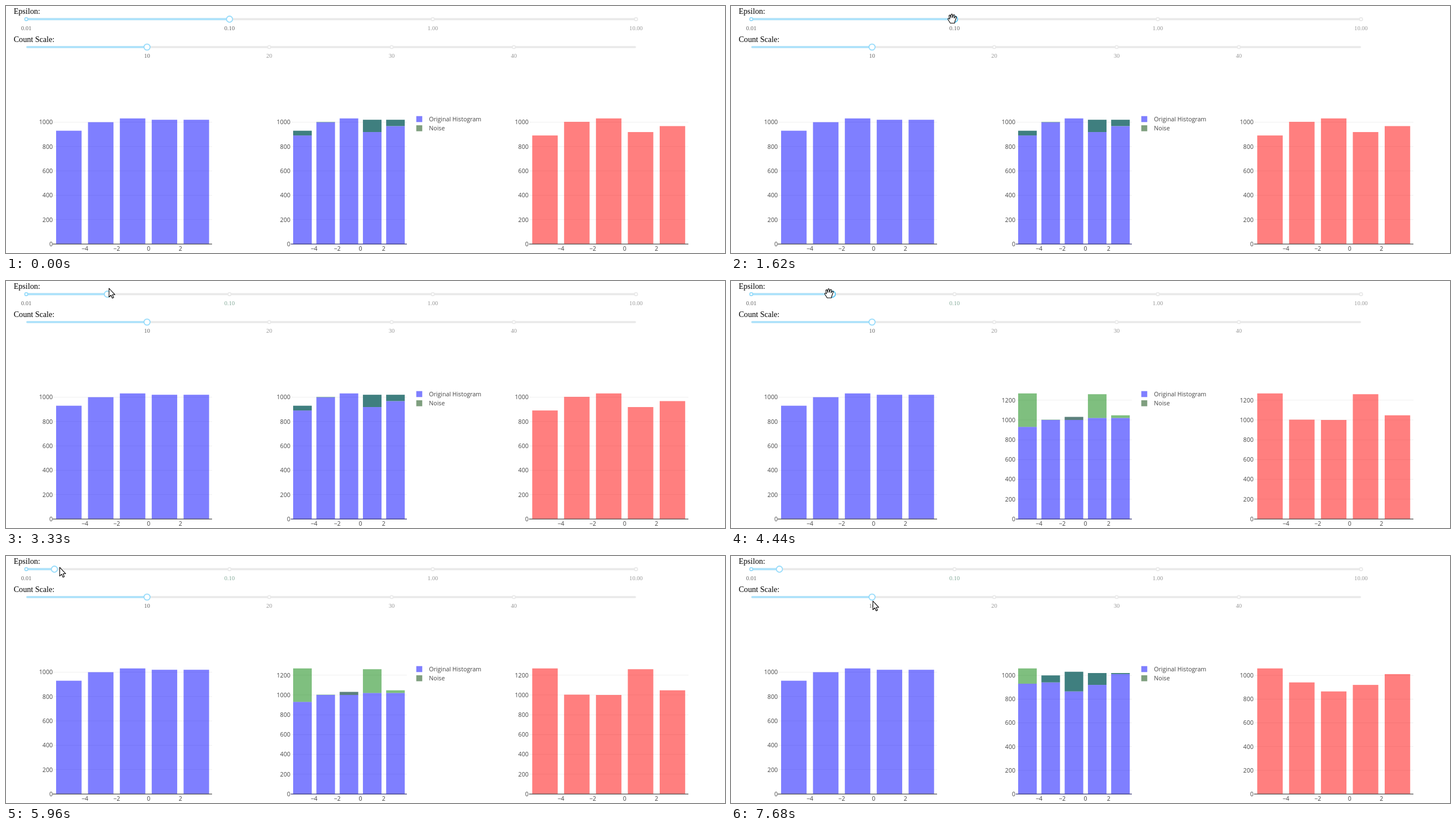
Write an HTML page that moves like this. It is 1277x439 px and loops after 8000 ms.

```html
<!DOCTYPE html>
<html lang="en">
<head>
<meta charset="utf-8">
<title>Noise histogram</title>
<style>
html, body { margin: 0; width: 100%; height: 100%; overflow: hidden; background: #fff; }
svg { display: block; width: 1277px; height: 439px; isolation: isolate; }
text { font: 10.6px "Open Sans", sans-serif; fill: #444; }
.title { font: 14.1px "Liberation Serif", serif; fill: #000; }
.mark { font: 10.6px "Liberation Serif", serif; fill: #999; text-anchor: middle; }
.mark.on { fill: #666; }
.mark.passed { fill: #84aa99; }
.tip { font: 11.3px "Liberation Sans", sans-serif; }
.cross { stroke: #fff; stroke-width: 2; mix-blend-mode: difference; }
.cursor { fill: #fff; stroke: #000; stroke-width: 1.1; stroke-linejoin: round; }
.icons { fill: none; stroke: #c7c7c7; stroke-width: 1.8; }
.solid { fill: #c7c7c7; stroke: none; }
</style>
</head>
<body>
<svg viewBox="0 0 1277 439">
  <rect width="1277" height="439" fill="#fff"/>
  <text class="title" x="13.7" y="14">Epsilon:</text>
  <text class="title" x="13.7" y="64">Count Scale:</text>
  <g id="charts"></g>
  <g id="legend">
    <rect x="728.7" y="195.7" width="10.6" height="10.6" fill="#7f7fff"/>
    <rect x="728.7" y="212" width="10.6" height="10.6" fill="#7f9f7f"/>
    <text x="751.3" y="205">Original Histogram</text>
    <text x="751.3" y="221.3">Noise</text>
  </g>
  <g id="sliders"></g>
  <g id="modebar"></g>
  <g id="tooltip" visibility="hidden">
    <path d="M544 221.5l5-5v-4h91v18.500h-91v-4z" fill="#00f"/>
    <rect x="641" y="211.500" width="71" height="20" fill="#fff" fill-opacity=".8"/>
    <text class="tip" x="551" y="225.500" style="fill:#fff;font-weight:bold">(−4.997027, 930)</text>
    <text class="tip" x="643.500" y="225.500" style="fill:#00f">Original His...</text>
  </g>
  <g id="pointer"></g>
</svg>
<script>
const LOOP = 8000, STEP = 65, BASE = 423, TOP = 223.2;
const $ = id => document.getElementById(id);
const rect = (x, y, w, h, fill, more = '') =>
  `<rect x="${x}" y="${y}" width="${w}" height="${h}" fill="${fill}" ${more}/>`;
const text = (x, y, str, attrs) => `<text x="${x}" y="${y}" ${attrs}>${str}</text>`;

const original = [930, 1000, 1031, 1020, 1020];
const noisy = [
  { from: 0, values: [891, 1003, 1031, 919, 968], loss: '#3f7f7f' },
  { from: 3450, values: [1268, 1003, 1000, 1260, 1047], loss: '#5c807c' },
  { from: 6030, values: [1059, 941, 865, 920, 1011], loss: '#3f7f7f' }
];

// Time spans in which the pointer moves; it rests in between.
const spans = [[580, 1360], [1420, 1680], [1890, 2650], [2730, 3180], [3330, 3450],
  [3930, 4190], [4380, 4590], [4860, 5620], [5770, 6550], [6630, 7410],
  [7470, 7470], [7680, 7680]];

// time, x, y, pointer shape, epsilon handle x
const keys = [
  [580, 962, 430, 'cross', 397],
  [645, 800, 395, 'arrow', 397],
  [710, 648, 353, 'cross', 397],
  [840, 526, 263, 'cross', 397],
  [905, 478, 210, 'arrow', 397],
  [1035, 415, 130, 'arrow', 397],
  [1360, 364, 42, 'arrow', 397],
  [1420, 374, 35, 'arrow', 397],
  [1550, 391, 23, 'hand', 397],
  [1680, 395, 22, 'hand', 397],
  [1890, 396, 21, 'grab', 397],
  [2470, 311, 22, 'grab', 318],
  [2650, 255, 22, 'grab', 268],
  [2730, 246, 22, 'grab', 257],
  [3180, 182, 14, 'grab', 180],
  [3330, 183, 13, 'arrow', 180],
  [3930, 181, 13, 'arrow', 180],
  [4190, 159, 14, 'arrow', 180],
  [4380, 166, 18, 'arrow', 180],
  [4440, 174, 22, 'hand', 180],
  [4590, 181, 22, 'hand', 180],
  [4860, 181, 20, 'grab', 180],
  [5300, 125, 30, 'grab', 128],
  [5620, 95, 21, 'grab', 86],
  [5770, 95, 20, 'arrow', 86],
  [5960, 95, 20, 'arrow', 86],
  [6550, 139, 39, 'arrow', 86],
  [6630, 150, 46, 'arrow', 86],
  [7050, 277, 92, 'arrow', 86],
  [7410, 246, 85, 'arrow', 86],
  [7470, 252, 81, 'arrow', 86],
  [7680, 252, 80, 'arrow', 86]
];

function heldTime(t) {
  const span = spans.filter(s => s[0] <= t).pop();
  return span ? Math.min(span[1], span[0] + Math.floor((t - span[0] + 5) / STEP) * STEP) : 0;
}

function poseAt(t) {
  const i = keys.findLastIndex(k => k[0] <= t);
  if (i < 0) return { shape: 'none', x: 0, y: 0, handle: 397 };
  const a = keys[i], b = keys[i + 1] || a;
  const f = b === a ? 0 : (t - a[0]) / (b[0] - a[0]);
  const mix = n => a[n] + (b[n] - a[n]) * f;
  return { x: mix(1), y: mix(2), shape: a[3], handle: mix(4) };
}

function chart({ left, right, label, bar, step, tick, axis }, max, bars) {
  const scale = TOP / max;
  let out = '';
  for (let v = 0; v <= max; v += 200) {
    const y = BASE - v * scale;
    if (v) out += rect(left, y - .45, right - left, .9, '#eee');
    out += text(label, y + 3.9, v, 'text-anchor="end"');
  }
  bars.forEach((parts, i) => parts.forEach(([lo, hi, fill, alpha = .5]) => {
    out += rect(bar + i * step, BASE - hi * scale, step * .8, (hi - lo) * scale, fill,
      `fill-opacity="${alpha}"`);
  }));
  out += rect(left - 1, BASE - .5, right - left + 1, 1.2, axis);
  ['−4', '−2', '0', '2'].forEach((s, i) => {
    out += text(tick + i * step, 435, s, 'text-anchor="middle"');
  });
  return out;
}

function drawCharts({ values, loss }) {
  const max = Math.max(...original, ...values);
  const stacked = original.map((v, i) => {
    const n = values[i];
    return n >= v ? [[0, v, '#00f'], [v, n, '#008000']]
                  : [[0, n, '#00f'], [n, v, loss, 1]];
  });
  $('charts').innerHTML =
    chart({ left: 84, right: 366, label: 83, bar: 89, step: 56.6, tick: 140, axis: '#444' },
      1031, original.map(v => [[0, v, '#00f']])) +
    chart({ left: 507, right: 712, label: 505, bar: 510, step: 41.3, tick: 547, axis: '#2e2e70' },
      max, stacked) +
    chart({ left: 930, right: 1212, label: 928, bar: 934.6, step: 56.6, tick: 985.5, axis: '#444' },
      Math.max(...values), values.map(v => [[0, v, '#f00']]));
}

const ring = (x, y, r, color) =>
  `<circle cx="${x}" cy="${y}" r="${r}" fill="#fff" stroke="${color}" stroke-width="1.8"/>`;

function slider(y, handle, dots, labels, shape) {
  let out = rect(36, y - 1.8, 1083, 3.6, '#e9e9e9', 'rx="1.8"') +
    rect(36, y - 1.8, handle - 36, 3.6, '#abe2fb', 'rx="1.8"');
  dots.forEach((x, i) => {
    const on = x <= handle + .5;
    out += ring(x, y, 2.7, on ? '#96dbfa' : '#e9e9e9') +
      text(x, y + 19.400, labels[i], `class="mark ${on ? 'on' : labels[i] === '0.10' ? 'passed' : ''}"`);
  });
  if (shape === 'grab') out += `<circle cx="${handle}" cy="${y}" r="8" fill="#57c5f7" opacity=".3"/>`;
  const busy = shape === 'grab' || shape === 'hand';
  return out + ring(handle, y, 5.4, busy ? '#57c5f7' : '#96dbfa');
}

function drawSliders({ handle, shape }) {
  $('sliders').innerHTML =
    slider(23.4, handle, [36, 397, 758, 1119], ['0.01', '0.10', '1.00', '10.00'], shape) +
    slider(73, 250.500, [250.500, 467.5, 685, 902], ['10', '20', '30', '40']);
}

const modebar = `<g class="icons">
  <path class="solid" d="M631 108.500h3.500l1.500-2h4l1.500 2h3.500v9.500h-14z"/>
  <circle cx="638" cy="113" r="2.6" stroke="#fff" stroke-width="1.3"/>
  <g stroke="#7a7a7a"><circle cx="664.500" cy="111" r="4.300"/>
    <path d="M667.500 114.500l4.500 4.500M662 111h5M664.500 108.500v5"/></g>
  <path d="M680.500 112.500h13M687 106v13" stroke-width="1.300"/>
  <path class="solid" d="M687 105l2.500 3.500h-5zM687 120l2.500-3.500h-5zM679.500 112.500l3.500-2.500v5zM694.500 112.500l-3.500-2.500v5z"/>
  <rect x="702" y="106.500" width="12" height="12" stroke-dasharray="2 1.400"/>
  <path d="M724 116c-3-4 0-8.500 5-8.500s7 3 5 6-7 3-9 1.500-1 4 0 4" stroke-width="1.400"/>
  <path class="solid" d="M750.500 106.500h12v12h-12zM771 106.500h12v12h-12z"/>
  <path d="M756.500 109v7M753 112.500h7M773.500 112.500h7" stroke="#fff"/>
  <path d="M792 110v-4h4M800 106h4v4M804 115v4h-4M796 119h-4v-4M794.500 108.500l7 8M801.500 108.500l-7 8" stroke-width="1.400"/>
  <path class="solid" d="M812.500 113l6.500-6.500 6.500 6.500h-1.500v5.500h-3.500v-4h-3v4h-3.500v-5.500z"/>
  <rect x="840" y="105.500" width="14" height="14" rx="1.500" fill="#1c1c1c" stroke="none"/></g>`;

const hand = 'M-3.5 8L-7.5 1.5C-8.5-.5-6-1.5-4.5 .8L-5.8-4.5C-6-6.8-3.8-7-3.3-5L-2.4-1.5L-2.2-6.5' +
  'C-2-8.600 .3-8.600 .4-6.500L.6-1.800L1.800-5.800C2.400-7.800 4.600-7 4.200-5L3.400-1L5-3' +
  'C6.500-5 8.200-3.500 7.200-2L5 4L4 8Z';
const fist = 'M-3.5 6L-6 1C-7-1-5.5-2-4.5-.5V-3C-4.5-5.5-2-5.5-1.8-4C-1.5-6 1-6 1.2-4' +
  'C1.8-5.5 4-5 3.8-3C4.5-4.2 6-3.5 5.8-1.5L5 3L3.8 6Z';
const shapes = {
  none: '',
  arrow: '<path class="cursor" d="M0 0V15.500L3.500 12.200L5.800 17.500L8.200 16.500L6 11.300H10.500Z"/>',
  cross: '<path class="cross" d="M-11 0H11M0-11V11"/>',
  hand: `<path class="cursor" d="${hand}"/>`,
  grab: `<circle r="11" fill="#fbf06b"/><path class="cursor" d="${fist}" style="fill:#fbf5a5"/>`
};

function drawPointer({ x, y, shape }) {
  const pointer = $('pointer');
  pointer.innerHTML = shapes[shape];
  pointer.setAttribute('transform', `translate(${x} ${y})`);
  // blending has to reach the page, so it sits on the outer group
  pointer.style.mixBlendMode = shape === 'cross' ? 'difference' : 'normal';

  const panel = x < 425 ? -424 : x < 850 ? 0 : 422;
  $('modebar').innerHTML = y > 105 && shape !== 'none' ? modebar : '';
  $('modebar').setAttribute('transform', `translate(${panel})`);
  const hovering = shape === 'cross' && x > 510 && x < 543;
  $('tooltip').setAttribute('visibility', hovering ? 'visible' : 'hidden');
}

let lastTime, lastData;
function frame() {
  const t = performance.now() % LOOP, held = heldTime(t);
  const data = noisy.filter(n => n.from <= t).pop();
  if (data !== lastData) drawCharts(lastData = data);
  if (held !== lastTime) {
    const pose = poseAt(lastTime = held);
    drawSliders(pose);
    drawPointer(pose);
  }
  requestAnimationFrame(frame);
}
frame();
</script>
</body>
</html>
```
